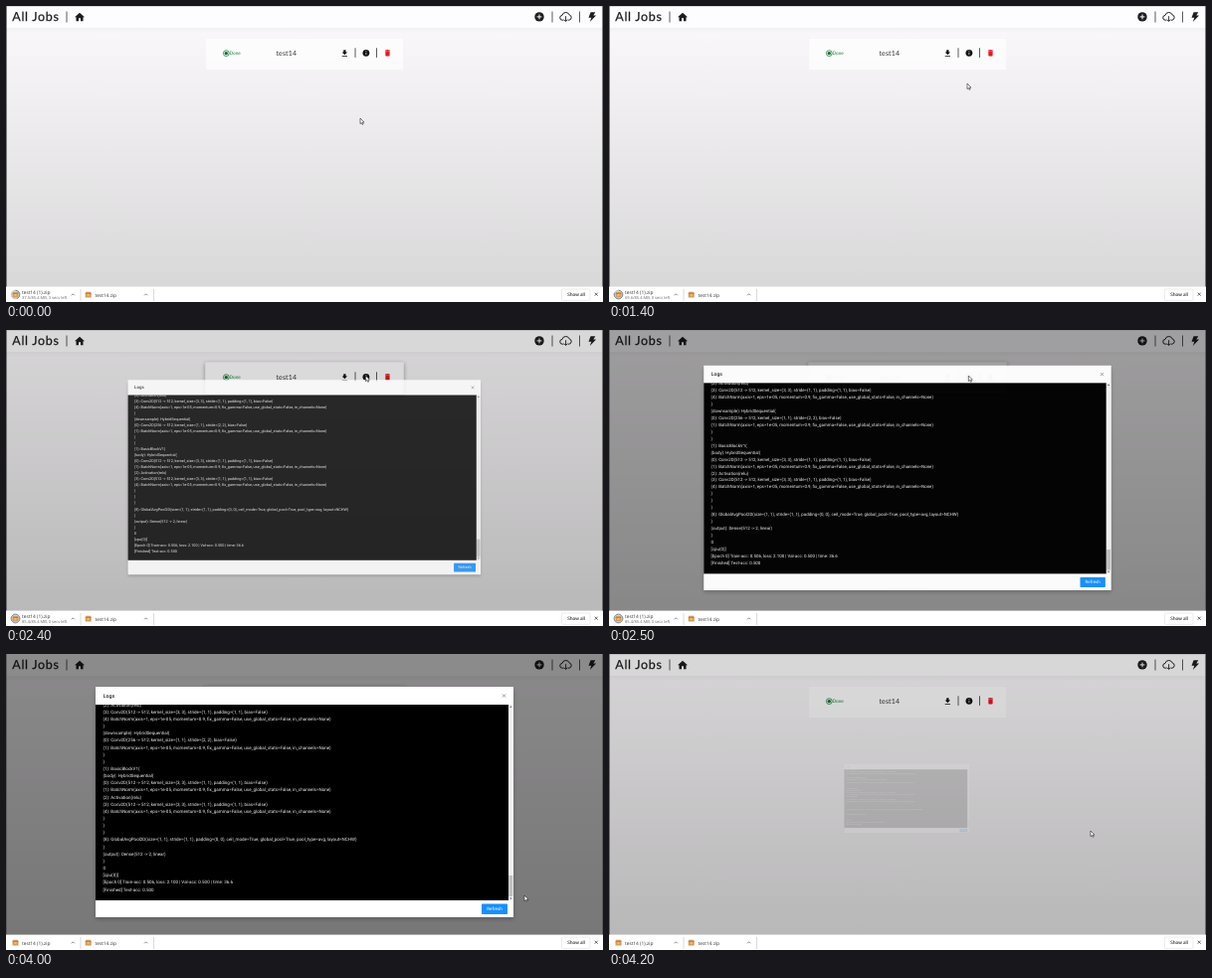
Write an HTML page that moves like this. It is 600 px wide and 298 px high and loops after 4300 ms.

```html
<!DOCTYPE html>
<html lang="en">
<head>
<meta charset="utf-8">
<title>Job logs</title>
<style>
html, body { margin: 0; width: 100%; height: 100%; overflow: hidden; background: #fff; }
svg { display: block; width: 100%; height: 100%; }
text { text-rendering: geometricPrecision; white-space: pre; }
.title { font-family: Lato, sans-serif; }
.ui { font-family: "Open Sans", sans-serif; }
.log { font-family: Roboto, sans-serif; }
</style>
</head>
<body>
<svg viewBox="0 0 600 298" xmlns="http://www.w3.org/2000/svg">
  <defs>
    <linearGradient id="sky" x1="0" y1="0" x2="0" y2="1">
      <stop offset="0" stop-color="#fcfafc"/>
      <stop offset="1" stop-color="#d9d8d9"/>
    </linearGradient>
    <linearGradient id="edge" x1="0" y1="0" x2="0" y2="1">
      <stop offset="0" stop-color="#000" stop-opacity=".035"/>
      <stop offset="1" stop-color="#000" stop-opacity="0"/>
    </linearGradient>
    <filter id="blur" x="-10%" y="-40%" width="120%" height="180%"><feGaussianBlur stdDeviation="2"/></filter>
    <clipPath id="screen"><rect x="90" y="51" width="415" height="197"/></clipPath>
    <g id="box">
      <path d="M.6 0H5.4L6 1.6V5.6H0V1.6Z" fill="#d99a55"/>
      <path d="M0 1.6H6" stroke="#a8672a" stroke-width=".5"/>
      <path d="M2 3.2H4" stroke="#fff" stroke-width=".7"/>
    </g>
    <path id="chevron" d="M-1.5 .8L0 -.7L1.5 .8" fill="none" stroke="#555" stroke-width=".7"/>
  </defs>

  <rect width="600" height="283" fill="url(#sky)"/>
  <rect width="600" height="22" fill="#fdfcfe"/>
  <rect y="22" width="600" height="5" fill="url(#edge)"/>

  <g fill="#1d1d1f">
    <text class="title" x="6.3" y="15" font-size="12.5" letter-spacing=".7" stroke="#1d1d1f" stroke-width=".25">All Jobs</text>
    <path transform="translate(68 5.2) scale(.5)" d="M10 20v-6h4v6h5v-8h3L12 3 2 12h3v8z"/>
    <circle cx="536" cy="10.9" r="4.7"/>
    <path d="M533.6 10.9h4.8M536 8.5v4.8" stroke="#fff" stroke-width="1"/>
    <path d="M560.5 14.2h-1.2a2.4 2.4 0 0 1-.3-4.8a3.7 3.7 0 0 1 7.1-.5a2.7 2.7 0 0 1-.2 5.3h-1.2" fill="none" stroke="#1d1d1f" stroke-width="1"/>
    <path d="M562.6 10.2v5M560.9 13.7l1.7 1.8l1.7-1.8" fill="none" stroke="#1d1d1f" stroke-width=".9"/>
    <path d="M587.6 6.2h4.7l-2 3.4h2.8L586.8 16l1.5-4.2h-2.8z"/>
    <path d="M61 5.5v11M549 5.5v11M576.5 5.5v11" stroke="#333" stroke-width=".8"/>
  </g>

  <rect id="shadow" x="200" y="33.5" width="200" height="32" fill="#000" opacity="0" filter="url(#blur)"/>
  <rect id="card" rx="1" fill="#fff"/>
  <circle cx="221.3" cy="47.6" r="2.9" fill="#fff" stroke="#11803a" stroke-width=".8"/>
  <circle cx="221.3" cy="47.6" r="1.7" fill="#0b6b2c"/>
  <text class="title" x="224.5" y="49.4" font-size="4.7" fill="#11803a">Done</text>
  <text class="title" x="271.5" y="50" font-size="7" letter-spacing=".12" fill="#333">test14</text>
  <path transform="translate(335.8 43.2) scale(.38)" d="M19 9h-4V3H9v6H5l7 7 7-7zM5 18v2h14v-2H5z" fill="#111"/>
  <circle cx="361.9" cy="47.3" r="3.4" fill="#111"/>
  <path d="M361.9 46.8v2.3M361.9 45.1v.8" stroke="#fff" stroke-width=".7"/>
  <path transform="translate(379.2 43) scale(.355)" d="M6 19c0 1.1.9 2 2 2h8c1.1 0 2-.9 2-2V7H6v12zM19 4h-3.5l-1-1h-5l-1 1H5v2h14V4z" fill="#ee1522"/>
  <path d="M351 42.3v9.6M372.5 42.3v9.6" stroke="#333" stroke-width=".8"/>

  <rect id="mask" width="600" height="283"/>
  <g id="modal">
    <rect x="90" y="36" width="420" height="231" fill="#000" opacity=".22" filter="url(#blur)"/>
    <rect x="90" y="33" width="420" height="232" rx=".6" fill="#fff"/>
    <text class="log" x="97.8" y="43.7" font-size="5.2" fill="#222" font-weight="500">Logs</text>
    <path d="M498.9 40.4l3.2 3.2M502.1 40.4l-3.2 3.2" stroke="#666" stroke-width=".6"/>
    <rect x="90" y="51" width="415" height="197" fill="#000"/>
    <g id="lines" class="log" clip-path="url(#screen)" font-size="4.53" fill="#f2f2f2"></g>
    <rect x="505" y="51" width="4.6" height="197" fill="#f1f1f1"/>
    <rect x="505.3" y="223" width="4" height="21" fill="#c1c1c1"/>
    <path d="M506 245.4h2.6l-1.3 1.5zM506 53.8h2.6l-1.3 -1.5z" fill="#666"/>
    <rect x="478" y="251.6" width="26" height="10.3" rx=".7" fill="#1890ff"/>
    <text class="log" x="491" y="258.3" font-size="4.55" fill="#fff" text-anchor="middle">Refresh</text>
  </g>

  <path d="M.4 0V283M599.6 0V283" stroke="#555" stroke-width=".8"/>
  <path d="M0 .2H600" stroke="#888" stroke-width=".4"/>

  <rect y="282.6" width="600" height="15.4" fill="#fff"/>
  <path d="M75 285v12M148.5 285v12" stroke="#ccc" stroke-width=".7"/>
  <g class="ui" font-size="4.8" fill="#333">
    <g id="ring">
      <circle cx="9.5" cy="290.5" r="4.3" fill="#dce3ea" stroke="#b9c4cf" stroke-width=".9"/>
      <path id="arc" fill="none" stroke="#6f8598" stroke-width=".9"/>
    </g>
    <use href="#box" x="6.5" y="287.8"/>
    <use href="#box" x="79.7" y="287.8"/>
    <text id="file" x="16">test14 (1).zip</text>
    <text id="size" x="16" y="295.2" font-size="4.05" fill="#666"></text>
    <text x="89.5" y="292.6">test14.zip</text>
    <use href="#chevron" x="67.3" y="290.5"/>
    <use href="#chevron" x="140.6" y="290.5"/>
    <rect x="558.5" y="285" width="28.5" height="11.4" rx="1" fill="#fff" stroke="#ddd" stroke-width=".6"/>
    <text x="573" y="292.2" font-size="4.6" text-anchor="middle" fill="#222" stroke="#222" stroke-width=".08">Show all</text>
    <path d="M591.7 288.7l3 3M594.7 288.7l-3 3" stroke="#444" stroke-width=".8"/>
  </g>

  <g id="pointer">
    <path id="arrow" d="M0 0V5.6L1.3 4.5L2.2 6.4L3.1 6L2.3 4.1H4Z" fill="#fff" stroke="#222" stroke-width=".6" stroke-linejoin="round"/>
    <path id="hand" d="M-.4 0H.5V2.2L2.8 2.8V4.6L2.2 6H-.2L-1.5 3.8L-.4 3.6Z" fill="#222" stroke="#555" stroke-width=".2"/>
  </g>
</svg>
<script>
const LOOP = 4300, STEP = 100;
const TOTAL = 85.4, START = 37.5, RATE = 22.93;
const OPEN = 2335, CLOSE = 4066, SAVED = 2800, HOVER = 1900;
const CENTER = [298.8, 144];

// time, x, y
const PATH = [
  [0, 356, 113], [1000, 356, 113], [1400, 360, 78], [1900, 362, 49], [2100, 362, 46],
  [2700, 361, 46], [3100, 513, 249], [3400, 513, 249], [3900, 521, 243],
  [4000, 521, 243], [4200, 484, 178], [LOOP, 470, 160]
];

const $ = id => document.getElementById(id);
const set = (id, attrs) => {
  for (const key in attrs) $(id).setAttribute(key, attrs[key]);
};
const clamp = v => Math.max(0, Math.min(1, v));

function bezier(x1, y1, x2, y2) {
  const at = (a, b, s) => 3 * (1 - s) ** 2 * s * a + 3 * (1 - s) * s * s * b + s ** 3;
  return x => {
    if (x <= 0 || x >= 1) return clamp(x);
    let lo = 0, hi = 1;
    for (let i = 0; i < 24; i++) {
      const mid = (lo + hi) / 2;
      if (at(x1, x2, mid) < x) lo = mid; else hi = mid;
    }
    return at(y1, y2, lo);
  };
}
const zoomIn = bezier(.08, .82, .17, 1);
const zoomOut = bezier(.78, .14, .15, .86);

function along(t) {
  const i = Math.max(1, PATH.findIndex(p => p[0] > t));
  const [t0, x0, y0] = PATH[i - 1], [t1, x1, y1] = PATH[i];
  const k = (t - t0) / (t1 - t0);
  return [x0 + (x1 - x0) * k, y0 + (y1 - y0) * k];
}

const conv = (n, from = 512, kernel = 3, stride = 1, pad = "padding=(1, 1), ") =>
  `(${n}): Conv2D(${from} -> 512, kernel_size=(${kernel}, ${kernel}), stride=(${stride}, ${stride}), ${pad}bias=False)`;
const norm = n =>
  `(${n}): BatchNorm(axis=1, eps=1e-05, momentum=0.9, fix_gamma=False, use_global_stats=False, in_channels=None)`;
const relu = "(2): Activation(relu)";

const LINES = [
  relu, conv(3), norm(4), ")",
  "(downsample): HybridSequential(", conv(0, 256, 1, 2, ""), norm(1), ")", ")",
  "(1): BasicBlockV1(", "(body): HybridSequential(",
  conv(0), norm(1), relu, conv(3), norm(4), ")", ")", ")",
  "(8): GlobalAvgPool2D(size=(1, 1), stride=(1, 1), padding=(0, 0), ceil_mode=True, global_pool=True, pool_type=avg, layout=NCHW)",
  ")", "(output): Dense(512 -> 2, linear)", ")", "0", "[cpu(0)]",
  "[Epoch 0] Train-acc: 0.506, loss: 2.100 | Val-acc: 0.500 | time: 36.6",
  "[Finished] Test-acc: 0.500"
];
LINES.forEach((line, i) => {
  const el = document.createElementNS("http://www.w3.org/2000/svg", "text");
  el.setAttribute("x", 97.5);
  el.setAttribute("y", 52.6 + i * 7.15);
  el.textContent = line;
  $("lines").append(el);
});

function drawDownload(t) {
  const saved = t >= SAVED;
  const done = Math.min(TOTAL, START + RATE * t / 1000);
  const secs = Math.max(0, Math.round(3 - t / 500));
  $("size").textContent = saved ? "" : `${done.toFixed(1)}/${TOTAL} MB, ${secs} secs left`;
  const angle = Math.min(.999, done / TOTAL) * 2 * Math.PI;
  const x = 9.5 + 4.3 * Math.sin(angle), y = 290.5 - 4.3 * Math.cos(angle);
  set("arc", { d: `M9.5 286.2A4.3 4.3 0 ${angle > Math.PI ? 1 : 0} 1 ${x} ${y}` });
  set("ring", { opacity: saved ? 0 : 1 });
  set("file", { y: saved ? 292.6 : 290.4 });
}

function drawCard(t) {
  const on = t >= HOVER && t < CLOSE;
  const grow = on ? .8 : 0;
  set("card", {
    x: 201 - grow, y: 33 - grow, width: 198 + 2 * grow, height: 31 + 2 * grow,
    "fill-opacity": on ? 1 : .72
  });
  set("shadow", { opacity: on ? .35 : 0 });
}

function drawModal(t) {
  const leaving = t >= CLOSE;
  const show = leaving ? 1 - zoomOut((t - CLOSE) / 200) : zoomIn((t - OPEN) / 300);
  const fade = leaving ? 1 - clamp((t - CLOSE) / 200) : clamp((t - OPEN) / 200);
  const scale = .2 + .8 * show;
  const [cx, cy] = CENTER;
  set("mask", { "fill-opacity": .45 * fade });
  set("modal", {
    opacity: show,
    transform: `translate(${cx} ${cy}) scale(${scale}) translate(${-cx} ${-cy})`
  });
}

function drawPointer(t) {
  const [x, y] = along(t);
  const hand = t >= HOVER && t < OPEN;
  set("pointer", { transform: `translate(${x} ${y})` });
  set("arrow", { opacity: hand ? 0 : 1 });
  set("hand", { opacity: hand ? 1 : 0 });
}

function render(ms) {
  const t = Math.floor((ms % LOOP) / STEP) * STEP;
  drawDownload(t);
  drawCard(t);
  drawModal(t);
  drawPointer(t);
}

const began = performance.now();
function tick() {
  render(performance.now() - began);
  requestAnimationFrame(tick);
}
tick();
</script>
</body>
</html>
```
